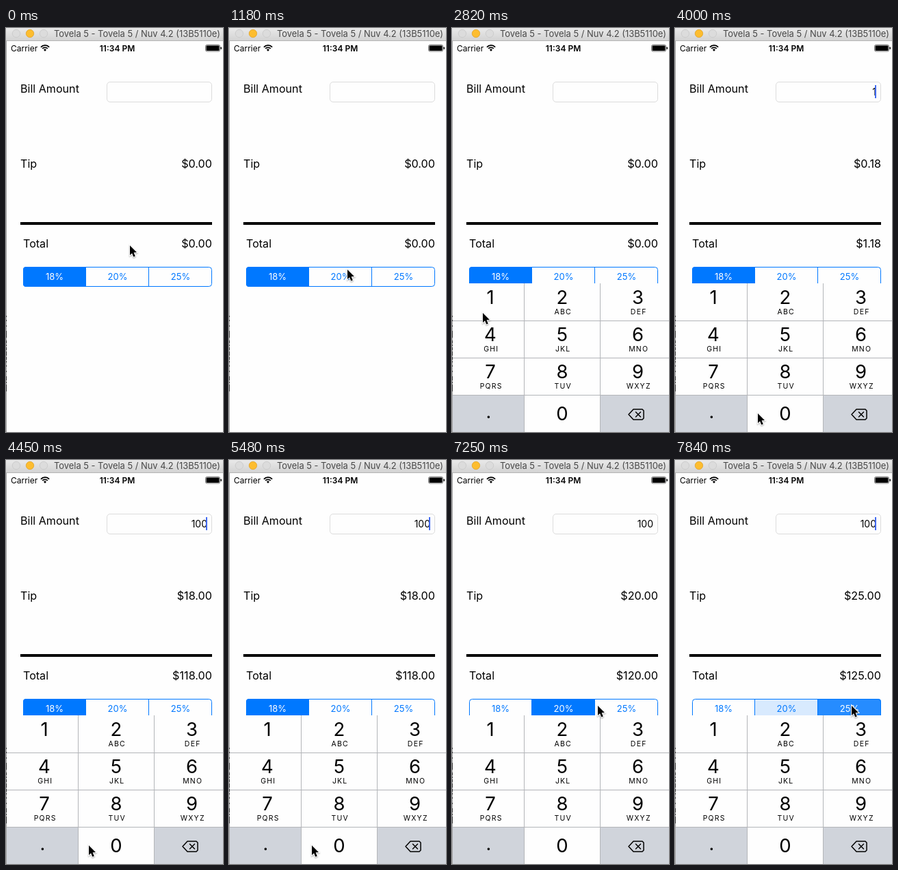
An HTML page with a canvas that plays this animation: 317 by 587 pixels, repeating every 7.99 s.

```html
<!DOCTYPE html>
<html lang="en">
<head>
<meta charset="utf-8">
<title>Tip calculator</title>
<style>
  html, body { margin: 0; width: 100%; height: 100%; overflow: hidden; background: #fefefe; }
  canvas { display: block; }
</style>
</head>
<body>
<canvas id="stage" width="317" height="587"></canvas>
<script>
const ctx = document.getElementById('stage').getContext('2d');
const LOOP = 7990, TICK = 148, LAST_TICK = 53;
const BLUE = '#0078ff', PAPER = '#fefefe', GREY_KEY = '#d0d4db';
const KEYBOARD_TOP = 371, KEYBOARD_HEIGHT = 216, ROW = 54;
const LETTERS = ['', 'ABC', 'DEF', 'GHI', 'JKL', 'MNO', 'PQRS', 'TUV', 'WXYZ'];
const RATES = [18, 20, 25];
const FOCUS_TIME = 2072;

const START = { x: 181, y: 316 };
const MOVES = [
  { start: 0, end: 1184, x: 173, y: 351, circle: true },
  { start: 1184, end: 1776, x: 257, y: 86 },
  { start: 2072, end: 2812, x: 45, y: 414 },
  { start: 3552, end: 3996, x: 121, y: 560 },
  { start: 5476, end: 6364, x: 168, y: 357 },
  { start: 6956, end: 7548, x: 258, y: 357 }
];
const TAPS = [
  { key: '1', down: 3404, up: 3552 },
  { key: '0', down: 4144, up: 4144 },
  { key: '0', down: 4144, up: 4440 }
];
const PICKS = [
  { segment: 1, down: 6660, up: 6808 },
  { segment: 2, down: 7696, up: 7844 }
];

const clamp = v => Math.min(1, Math.max(0, v));
const isHeld = (press, t) => t >= press.down && t < press.up;

function text(str, x, y, size, { color = '#000', align = 'left', weight = 400, spacing = 0 } = {}) {
  ctx.font = `${weight} ${size}px Inter, "Liberation Sans", sans-serif`;
  ctx.letterSpacing = spacing + 'px';
  ctx.textAlign = align;
  ctx.fillStyle = color;
  ctx.fillText(str, x, y);
}

function rect(x, y, w, h, color) {
  ctx.fillStyle = color;
  ctx.fillRect(x, y, w, h);
}

function roundRect(x, y, w, h, r) {
  ctx.beginPath();
  ctx.roundRect(x, y, w, h, r);
}

function polyline(points, close) {
  ctx.beginPath();
  points.forEach(([x, y]) => ctx.lineTo(x, y));
  if (close) ctx.closePath();
}

function fill(color) {
  ctx.fillStyle = color;
  ctx.fill();
}

function stroke(color, width = 1) {
  ctx.strokeStyle = color;
  ctx.lineWidth = width;
  ctx.stroke();
}

function drawWindow() {
  rect(0, 0, 317, 587, PAPER);
  const bar = ctx.createLinearGradient(0, 0, 0, 18);
  bar.addColorStop(0, '#e9e9e9');
  bar.addColorStop(1, '#d3d3d3');
  rect(0, 0, 317, 18, bar);
  rect(0, 18, 317, 1, '#b4b4b4');
  for (let i = 0; i < 3; i++) {
    ctx.beginPath();
    ctx.arc(15 + 20 * i, 8, 5.7, 0, Math.PI * 2);
    fill(i === 1 ? '#fdbd2f' : '#dcdcdc');
    stroke(i === 1 ? '#e0a22a' : '#c8c8c8', 0.8);
  }
  text('Tovela 5 - Tovela 5 / Nuv 4.2 (13B5110e)', 70, 13, 12.9, { color: '#484848' });
}

// Slivers of a window behind show along the left edge
function drawWindowEdge() {
  rect(0, 19, 1, 568, '#a2a2a2');
  for (let y = 418; y < 528; y += 2) {
    if (Math.sin(y * y) > 0) rect(0, y, 1, 2, '#333');
  }
}

function drawStatus() {
  text('Carrier', 7, 33.5, 12);
  text('11:34 PM', 162.5, 33.5, 12, { align: 'center', weight: 600 });
  ctx.lineCap = 'butt';
  const wave = r => ctx.arc(57, 33.5, r, -Math.PI * 0.76, -Math.PI * 0.24);
  for (const r of [8.3, 5.2]) {
    ctx.beginPath();
    wave(r);
    stroke('#000', 1.7);
  }
  ctx.beginPath();
  ctx.moveTo(57, 34);
  wave(2.8);
  fill('#000');
  roundRect(291.5, 24.5, 21, 9.5, 2);
  stroke('#555', 0.8);
  roundRect(292.5, 25.5, 19, 7.5, 1);
  fill('#000');
  roundRect(313.5, 27.5, 1.5, 3.5, 0.7);
  fill('#000');
}

// The blink restarts on focus and with each typed digit
function caretAlpha(t) {
  if (t < FOCUS_TIME) return 0;
  const restart = Math.max(FOCUS_TIME, ...TAPS.map(tap => tap.up).filter(up => up <= t));
  const phase = (t - restart) % 980;
  return phase < 545 ? 1 : phase < 640 ? 0.5 : 0;
}

function drawForm(t) {
  const typed = TAPS.filter(tap => tap.up <= t).map(tap => tap.key).join('');
  const rate = RATES[PICKS.filter(pick => pick.up <= t).length];
  const bill = Number(typed);
  const tip = bill * rate / 100;
  const label = (str, x, y) => text(str, x, y, 16.1);
  const money = (n, y) => text('$' + n.toFixed(2), 301, y, 16.2, { align: 'right' });

  label('Bill Amount', 21, 94);
  label('Tip', 21, 203);
  label('Total', 25, 319);
  money(tip, 203);
  money(bill + tip, 319);
  rect(21, 282, 280, 4, '#000');

  roundRect(147.5, 78.5, 153, 29, 4.5);
  stroke('#dcdcdc');
  text(typed, 294, 98, 14, { align: 'right' });
  ctx.globalAlpha = caretAlpha(t);
  rect(292, 83, 2, 19, '#426bf2');
  ctx.globalAlpha = 1;
}

// Each pick tints its segment while held, then cross-fades to it
function segmentFills(t) {
  let fills = [1, 0, 0];
  for (const pick of PICKS) {
    const fade = clamp((t - pick.up + 126) / TICK);
    fills = fills.map((old, i) => i === pick.segment
      ? Math.max(fade, isHeld(pick, t) ? 0.16 : 0)
      : old * (1 - fade));
  }
  return fills;
}

function drawSegments(t) {
  const fills = segmentFills(t);
  ctx.save();
  roundRect(25, 347, 276, 29, 4);
  ctx.clip();
  fills.forEach((alpha, i) => {
    ctx.globalAlpha = alpha;
    rect(25 + 92 * i, 347, 92, 29, BLUE);
  });
  ctx.restore();
  rect(116, 347, 1, 29, BLUE);
  rect(208, 347, 1, 29, BLUE);
  roundRect(25.5, 347.5, 275, 28, 4);
  stroke(BLUE);
  RATES.forEach((rate, i) => {
    text(rate + '%', 71 + 92 * i, 366, 13, { align: 'center', color: fills[i] > 0.5 ? '#fff' : BLUE });
  });
}

function drawBackspace() {
  ctx.lineJoin = ctx.lineCap = 'round';
  polyline([[258, 561.5], [265, 554], [278, 554], [280, 556], [280, 567], [278, 569], [265, 569]], true);
  stroke('#000', 1.5);
  for (const side of [-1, 1]) {
    polyline([[272 - 3.5 * side, 558], [272 + 3.5 * side, 565]]);
    stroke('#000', 1.5);
  }
}

function drawKey(col, row, held) {
  const left = [1, 106, 217][col], right = [105, 216, 317][col];
  const top = KEYBOARD_TOP + row * ROW, gap = row ? 1 : 0;
  const center = (left + right) / 2 + 3 * (col - 0.0) / 2;
  const digit = row < 3 ? String(row * 3 + col + 1) : ['.', '0', ''][col];
  const grey = (row === 3 && col !== 1) || held.includes(digit);
  const middle = col === 0 ? 56 : col === 1 ? 161 : 271.5;
  rect(left, top + gap, right - left, ROW - gap, grey ? GREY_KEY : PAPER);
  if (digit === '.') text(digit, 53.5, 566.5, 27, { align: 'center' });
  else text(digit, middle, top + (row < 3 ? 30 : 37), 27.5, { align: 'center' });
  if (row < 3) text(LETTERS[row * 3 + col], middle + 1.2, top + 45, 10.5, { align: 'center', spacing: 1.2 });
}

function drawKeyboard(t) {
  const progress = clamp((t - FOCUS_TIME + 40) / 400);
  if (!progress) return;
  const held = TAPS.filter(tap => isHeld(tap, t)).map(tap => tap.key);
  ctx.save();
  ctx.translate(0, KEYBOARD_HEIGHT * (1 - progress) ** 3);
  rect(1, KEYBOARD_TOP, 316, KEYBOARD_HEIGHT, '#b3b5b9');
  for (let row = 0; row < 4; row++) {
    for (let col = 0; col < 3; col++) drawKey(col, row, held);
  }
  drawBackspace();
  ctx.restore();
}

function pointerAt(t) {
  let { x, y } = START;
  for (const move of MOVES) {
    const k = clamp((t - move.start) / (move.end - move.start));
    const eased = k * k * (3 - 2 * k);
    x += (move.x - x) * eased;
    y += (move.y - y) * eased;
    if (move.circle) {
      const reach = Math.sqrt(Math.max(0, Math.sin(Math.PI * k)));
      const angle = 2 * Math.PI * (k - 0.1);
      x -= 74 * reach * Math.cos(angle);
      y -= 122 * reach * Math.sin(angle);
    }
  }
  return [x, y];
}

function drawPointer(t) {
  ctx.save();
  ctx.translate(...pointerAt(t));
  ctx.lineJoin = 'miter';
  polyline([[0, 0], [0, 14], [3.1, 11.2], [5.3, 16.4], [7.8, 15.4], [5.6, 10.2], [10, 10]], true);
  ctx.shadowColor = 'rgba(0,0,0,0.35)';
  ctx.shadowBlur = 2;
  ctx.shadowOffsetY = 1;
  stroke('#fff', 2);
  ctx.shadowColor = 'transparent';
  fill('#000');
  ctx.restore();
}

function draw(t) {
  drawWindow();
  drawStatus();
  drawForm(t);
  drawSegments(t);
  drawKeyboard(t);
  drawWindowEdge();
  drawPointer(t);
}

function loop() {
  const elapsed = performance.now() % LOOP;
  draw(Math.min(LAST_TICK, Math.floor((elapsed + 8) / TICK)) * TICK);
  requestAnimationFrame(loop);
}
loop();
</script>
</body>
</html>
```
